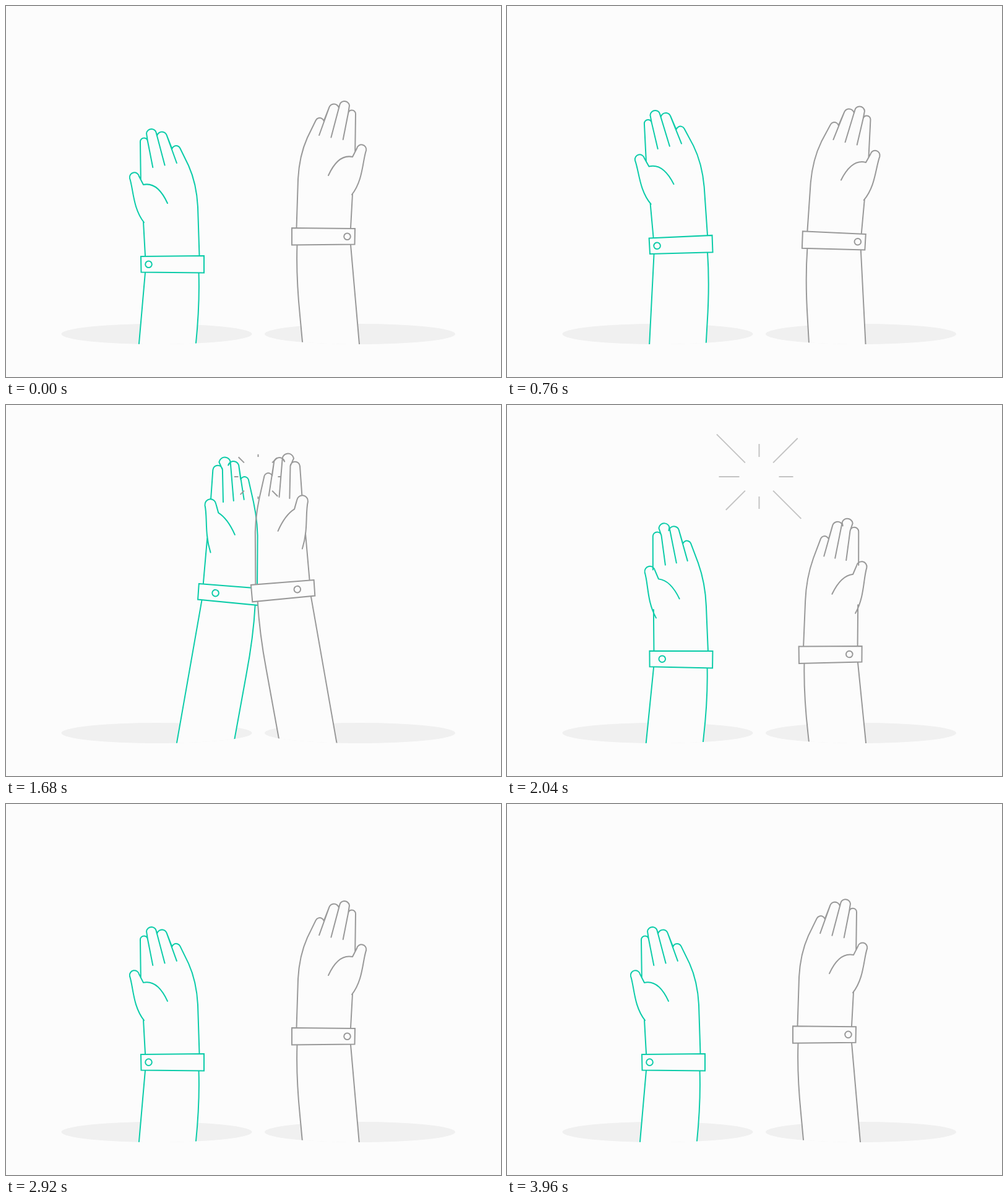
An HTML page with a canvas for the animation above (4 s loop, 800 by 600 pixels).

```html
<!DOCTYPE html>
<html lang="en">
<head>
<meta charset="utf-8">
<title>High five</title>
<style>
  html, body { margin: 0; width: 100%; height: 100%; overflow: hidden; background: #fcfcfc; }
  canvas { display: block; }
</style>
</head>
<body>
<canvas id="stage" width="800" height="600"></canvas>
<script>
const ctx = document.getElementById('stage').getContext('2d');
const { PI, cos, sin } = Math;
const LOOP = 4000, STEP = 40, MIRROR = 815;
const PAPER = '#fcfcfc', SHADOW = '#f0f0f0', GREEN = '#0ccca9', GREY = '#999';
const HIT = 1640, RELEASE = 1700;

const cuff = new Path2D('M0 0L102 -1L102 26.5L.5 25.5Z');
const arm = new Path2D('M7 26L-16 290H75L89 140C92 110 95 70 93.5 26');
const rayTips = [55, 96, 52, 76, 65, 97, 53, 88];
const fingers = [
  { x: 5, y: -185.5, r: 6 },
  { x: 17, y: -198, r: 8 },
  { x: 34, y: -193.3, r: 8.2 },
  { x: 57, y: -172, r: 7 }
];

const mix = (a, b, k) => a + (b - a) * k;
const ramp = (t, from, to) => Math.max(0, Math.min(1, (t - from) / (to - from)));
const ease = (t, from, to) => {
  const u = ramp(t, from, to);
  return u * u * (3 - 2 * u);
};

// Accelerates from ready to the clap, then flies back and settles at rest
function swing(t, ready, clap, rest, powerIn, powerOut) {
  return t < RELEASE
    ? mix(ready, clap, ramp(t, 1000, HIT) ** powerIn)
    : mix(rest, clap, (1 - ramp(t, RELEASE, 2500)) ** powerOut);
}

// Each hand floats on its own and is drawn into the shared clapping motion
function poseAt(t, homeX, homeY, float) {
  const join = .83 * ease(t, 300, 760);
  const joinX = join * (1 - ease(t, RELEASE, 2900));
  const joinY = join * (1 - ease(t, 2040, 3080));
  const floatY = homeY + float * (1 - cos(2 * PI * t / 1000));
  return {
    x: mix(homeX, swing(t, 232, 331, 190, 1.6, 2), joinX),
    y: mix(floatY, swing(t, 370, 266, 408, 3, 4.5), joinY),
    tilt: swing(t, -2.5, 6, 0, 2, 3) * joinX * PI / 180,
    turn: ease(t, 800, 1300) - ease(t, 1790, 2300)
  };
}

function drawFingers(turn, point) {
  let last;
  fingers.forEach(({ x, y, r }, i) => {
    const [cx, cy] = point(x, y);
    const radius = r + turn * (2 - .04 * x);
    const right = -.2 - .08 * i;
    last = last || [cx - radius + .8, -124 - 14 * turn];
    ctx.moveTo(...last);
    ctx.arc(cx, cy, radius, PI + .1 * i, right);
    last = [cx + radius * cos(right), cy + radius * sin(right)];
    if (i < 3) ctx.lineTo(...point(19.3 * (i + 1), -144 - 3.5 * i, 1, 9));
  });
  ctx.lineTo(...point(77, -147, 0, 7));
  ctx.quadraticCurveTo(...point(90, -118, 0, 14), ...point(92, -80, 0, 12));
  ctx.lineTo(94.5, -1);
}

function drawThumb(turn, point) {
  ctx.moveTo(...point(43, -86, 4, 2));
  ctx.quadraticCurveTo(...point(27, -121, 4, 12), ...point(4, -116, 8, -1));
  ctx.arc(...point(-10.5, -128, 6.5, -1), 7.7 + 1.3 * turn, -.2, PI - .2, true);
  ctx.bezierCurveTo(...point(-12, -108, 5), ...point(-13, -78, 3, -4), ...point(5, -55, 0, 3));
  ctx.moveTo(4 + 3 * turn, -56 - 21 * turn);
  ctx.lineTo(7, -1);
}

function drawHand(color, { x, y, tilt, turn }) {
  // Turning the palm slides its near side inwards; depth and drop add to that
  const point = (px, py, depth = 0, drop = 0) =>
    [px + turn * (10 - .14 * px + depth), py + turn * drop];

  ctx.beginPath();
  ctx.rect(-100, -100, 1000, 630.5);
  ctx.ellipse(243.5, 530.5, 154, 16.5, 0, 0, 7);
  ctx.clip();
  ctx.translate(x, y);
  ctx.rotate(tilt);
  ctx.strokeStyle = color;
  ctx.fillStyle = PAPER;
  ctx.lineWidth = 2;
  ctx.lineCap = ctx.lineJoin = 'round';
  ctx.fill(arm);
  ctx.stroke(arm);
  ctx.beginPath();
  drawFingers(turn, point);
  drawThumb(turn, point);
  ctx.stroke();
  ctx.lineJoin = 'miter';
  ctx.fill(cuff);
  ctx.stroke(cuff);
  ctx.beginPath();
  ctx.arc(12.5 + 15.5 * turn, 12.7, 5.3, 0, 7);
  ctx.stroke();
}

function drawShadow(x) {
  ctx.fillStyle = SHADOW;
  ctx.beginPath();
  ctx.ellipse(x, 530.5, 154, 16.5, 0, 0, 7);
  ctx.fill();
}

function drawBurst(t) {
  const grow = ramp(t, 1650, 1800);
  if (!grow) return;
  ctx.globalAlpha = 1 - ramp(t, 1840, 2300);
  ctx.strokeStyle = GREY;
  ctx.lineWidth = 2;
  ctx.translate(407.5, 116);
  ctx.beginPath();
  rayTips.forEach((tip, i) => {
    const dx = cos(i * PI / 4), dy = sin(i * PI / 4), end = mix(32, tip, grow);
    ctx.moveTo(dx * 32, dy * 32);
    ctx.lineTo(dx * end, dy * end);
  });
  ctx.stroke();
}

function isolated(draw) {
  ctx.save();
  draw();
  ctx.restore();
}

function render(t) {
  ctx.fillStyle = PAPER;
  ctx.fillRect(0, 0, 800, 600);
  drawShadow(243.5);
  drawShadow(MIRROR - 243);
  isolated(() => drawHand(GREEN, poseAt(t, 218, 405, -2.3)));
  isolated(() => {
    ctx.translate(MIRROR, 0);
    ctx.scale(-1, 1);
    drawHand(GREY, poseAt(t, 251, 360, 4.5));
  });
  isolated(() => drawBurst(t));
}

const start = performance.now();
function frame() {
  const t = (performance.now() - start) % LOOP;
  render(Math.floor(t / STEP) * STEP);
  requestAnimationFrame(frame);
}
frame();
</script>
</body>
</html>
```
